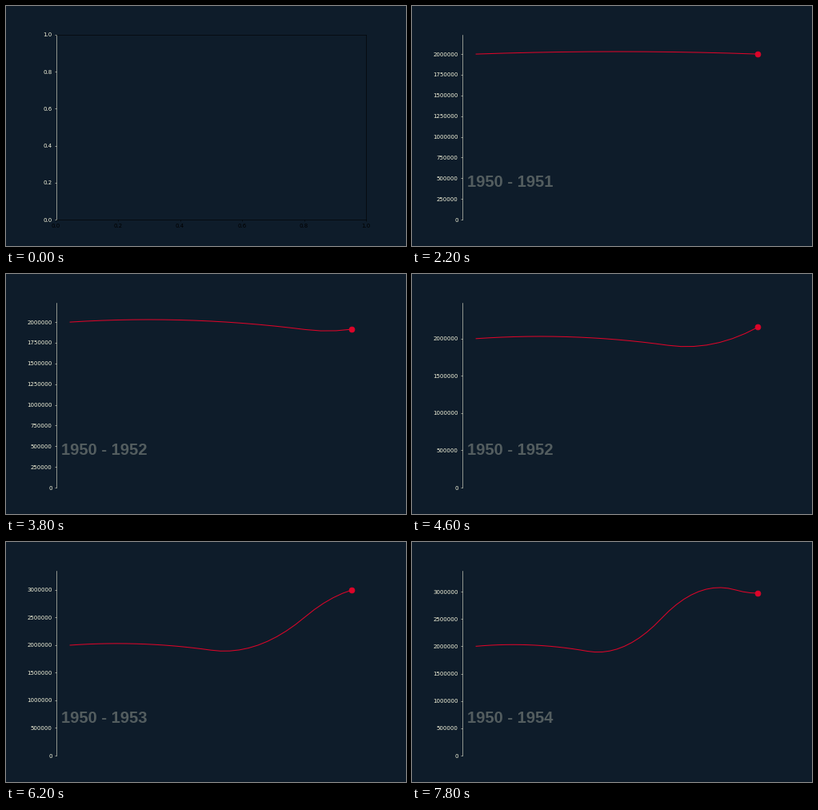
Recreate the animation shown at these times as a matplotlib script. Size 500 px wide and 300 px high, loop 8 s.

```python
import numpy as np
import matplotlib.pyplot as plt
from matplotlib.animation import FuncAnimation

BG, INK, RED = "#0e1c2a", "beige", "#dc0529"
FRAMES, INTERVAL = 40, 200
START_YEAR, STEPS = 1950, 10


def series(t):
    """Quadratic spline through the yearly values, ten steps per year."""
    def bend(knot):
        return np.clip(t - knot, 0, None) ** 2
    y = 2 + 0.012 * t - 0.0012 * t**2
    y += 0.0096 * bend(15) - 0.0176 * bend(25) + 0.016 * bend(35)
    return y * 1e6


t = np.arange(FRAMES + 1)
values = series(t)

fig, ax = plt.subplots(figsize=(10, 6), dpi=50, facecolor=BG)
ax.set_facecolor(BG)
ax.tick_params(axis="y", colors=INK)
ax.spines["left"].set_color(INK)
ax.ticklabel_format(axis="y", style="plain", useOffset=False)

line, = ax.plot([], [], color=RED, lw=1.5)
dot = ax.scatter([], [], s=100, color=RED)
span = fig.text(69 / 500, 74 / 300, "", color=INK, alpha=0.3,
                fontsize=29, fontfamily="Liberation Sans", fontweight="bold")


def update(frame):
    started = frame > 0
    for side in ("top", "right", "bottom"):
        ax.spines[side].set_visible(not started)
    ax.xaxis.set_visible(not started)
    for artist in (line, dot, span):
        artist.set_visible(started)

    if not started:
        ax.set(xlim=(0, 1), ylim=(0, 1))
        return

    last = frame - 1
    line.set_data(t[:frame], values[:frame])
    dot.set_offsets([[last, values[last]]])
    margin = 0.05 * last or 1
    ax.set_xlim(-margin, last + margin)
    ax.set_ylim(0, 1.1 * values[:frame + 1].max())
    span.set_text(f"{START_YEAR} - {START_YEAR + frame / STEPS:.0f}")


anim = FuncAnimation(fig, update, frames=FRAMES, interval=INTERVAL,
                     repeat=True, repeat_delay=0)
plt.show()
```
